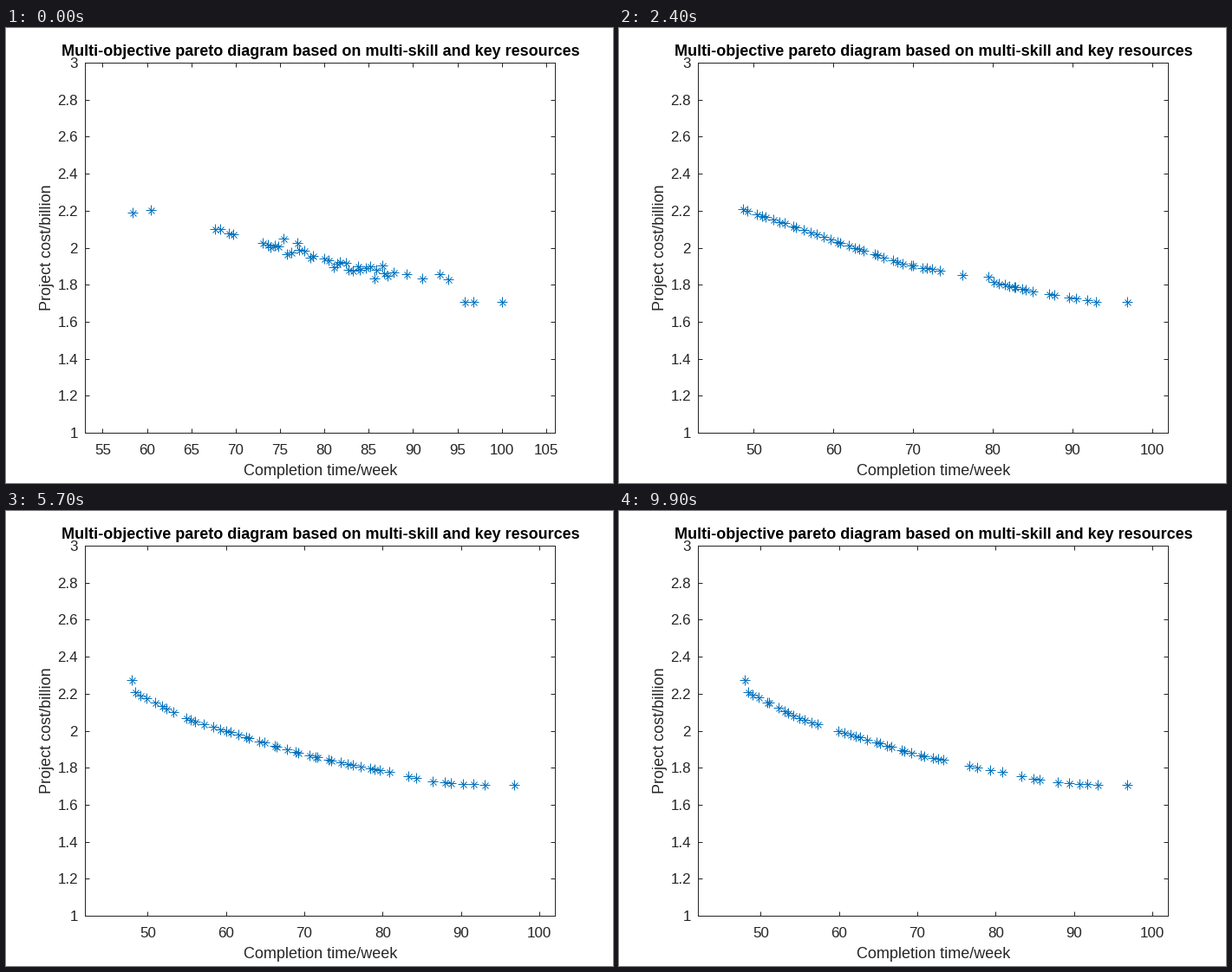
Animation of 700 by 525 pixels, one loop 10000 ms. Source, as a matplotlib script:

```python
import numpy as np
import matplotlib.pyplot as plt
from matplotlib.animation import FuncAnimation
from matplotlib.ticker import FormatStrFormatter, MultipleLocator

W, H, DPI = 700, 525, 100
PX = 72 / DPI
FRAMES, INTERVAL = 100, 100
INK, BLUE = "#262626", "#0072BD"
BIN = 1.5  # weeks replaced together

plt.rcParams["font.family"] = "Liberation Sans"

# Cost curves: a few (week, cost) key points each
ROUGH = [(58.4, 2.19), (60.4, 2.205), (67.65, 2.1), (75, 2.0), (85, 1.88),
         (94, 1.83), (95.8, 1.705), (100.05, 1.705)]
EARLY = [(49, 2.268), (53.2, 2.22), (54.4, 2.184), (55.85, 2.104),
         (60.5, 2.067), (62.5, 2.01), (67.7, 1.992), (69, 1.925),
         (70.6, 1.894), (78.9, 1.88), (84, 1.775), (91.2, 1.744),
         (93, 1.707)]
MIDDLE = [(48.66, 2.207), (56.4, 2.095), (62.5, 2.003), (69, 1.91),
          (76.2, 1.852), (79.4, 1.845), (80, 1.815), (85, 1.763),
          (93, 1.707)]
BEST = [(47.97, 2.272), (48.41, 2.207), (55, 2.065), (62, 1.972),
        (70, 1.87), (78, 1.8), (87, 1.722), (93, 1.707)]


def front(curve, runs, seed, spread=0.0):
    """Points along a curve; each run is (first week, last week, count)."""
    rng = np.random.default_rng(seed)
    kx, ky = np.transpose(curve)
    parts = []
    for start, end, n in runs:
        x = np.linspace(start, end, n)
        inner = (x > start) & (x < end)
        step = (end - start) / max(n - 1, 1)
        x = x + inner * rng.uniform(-0.45, 0.45, n) * step
        y = np.interp(x, kx, ky) + inner * rng.normal(0, spread, n)
        parts.append(np.column_stack([x, y]))
    return np.vstack(parts)


HEAD = [(47.97, 47.97, 1)]
TAIL = [(83.3, 93, 8), (96.84, 96.84, 1)]

STAGES = [
    (0, front(ROUGH, [(58.4, 60.4, 2), (67.65, 69.7, 4), (73.05, 78.7, 13),
                      (80, 87.8, 18), (89.25, 93.95, 4), (95.8, 96.8, 2),
                      (100.05, 100.05, 1)], 1, spread=0.025)),
    (10, front(EARLY, [(48.98, 54.4, 11), (55.85, 55.85, 1), (60.4, 62.5, 4),
                       (65.85, 65.85, 1), (67.7, 70.6, 7), (77.15, 77.15, 1),
                       (78.9, 84.45, 13), (87.05, 91.2, 2), (92.25, 93, 3),
                       (96.83, 96.83, 1)], 2)),
    (24, front(MIDDLE, [(48.66, 73.4, 33), (76.17, 76.17, 1), (79.43, 85, 10),
                        (87.05, 93, 6), (96.83, 96.83, 1)], 3)),
    (45, front(BEST, [(48.44, 80.74, 37)] + TAIL, 4)),
    (57, front(BEST, HEAD + [(48.41, 80.82, 38)] + TAIL, 5)),
    (83, front(BEST, HEAD + [(48.41, 67.8, 24), (70.64, 80.82, 14)] + TAIL, 6)),
    (99, front(BEST, HEAD + [(48.41, 57.26, 13), (59.92, 73.3, 18),
                             (76.6, 80.82, 4)] + TAIL, 7)),
]


def converge(a, b, t, rng):
    """The scattered population drifts unevenly onto its first front."""
    match = b[np.linspace(0, len(b) - 1, len(a)).round().astype(int)]
    noise = rng.normal(0, 0.35, len(a)) * t * (1 - t)
    p = np.clip(t * (2 - t) + noise, 0, 1)[:, None]
    return a + (match - a) * p


def replace(a, b, t, rng):
    """Each stretch of the front swaps to its successor at its own moment."""
    swap = rng.uniform(0.03, 0.98, 80)
    swap[int(HEAD[0][0] / BIN)] = 0.5
    old = t < swap[(a[:, 0] / BIN).astype(int)]
    new = t >= swap[(b[:, 0] / BIN).astype(int)]
    return np.vstack([a[old], b[new]])


def population(i):
    k = max(k for k in range(len(STAGES) - 1) if STAGES[k][0] <= i)
    (start, a), (end, b) = STAGES[k], STAGES[k + 1]
    t = (i - start) / (end - start)
    if t == 0:
        return a
    if t == 1:
        return b
    if k == 0:
        return converge(a, b, t, np.random.default_rng(i))
    return replace(a, b, t, np.random.default_rng(70 + k))


fig = plt.figure(figsize=(W / DPI, H / DPI), dpi=DPI, facecolor="white")
ax = fig.add_axes([91 / W, 58 / H, 542 / W, 427 / H])
ax.set_ylim(1, 3)
ax.yaxis.set_major_locator(MultipleLocator(0.2))
for axis in (ax.xaxis, ax.yaxis):
    axis.set_major_formatter(FormatStrFormatter("%g"))
ax.tick_params(direction="in", top=True, right=True, length=5 * PX,
               width=PX, color=INK, labelcolor=INK, labelsize=17 * PX)
ax.tick_params(axis="x", pad=12.5 * PX)
ax.tick_params(axis="y", pad=8 * PX)
for spine in ax.spines.values():
    spine.set(color=INK, linewidth=PX)


def label(x, y, text, **kw):
    fig.text(x / W, 1 - y / H, text, size=18 * PX, ha="center", va="baseline",
             rotation_mode="anchor", **kw)


label(362.5, 32, "Multi-objective pareto diagram based on multi-skill "
      "and key resources", weight="bold", color="black")
label(362.5, 516, "Completion time/week", color=INK)
label(52, 253, "Project cost/billion", color=INK, rotation=90)

# An eight-armed star: an upright cross over a smaller diagonal one
stars = [ax.plot([], [], m, ms=size * PX, mew=PX, color=BLUE)[0]
         for m, size in (("+", 12), ("x", 7))]


def update(i):
    pts = population(i)
    lo = np.floor(pts[:, 0].min()) - 5
    hi = np.ceil(pts[:, 0].max()) + 5
    ax.set_xlim(lo, hi)
    ax.xaxis.set_major_locator(MultipleLocator(5 if hi - lo < 56 else 10))
    for s in stars:
        s.set_data(pts[:, 0], pts[:, 1])
    return stars


anim = FuncAnimation(fig, update, frames=FRAMES, interval=INTERVAL,
                     init_func=lambda: update(0), repeat=True,
                     repeat_delay=0, blit=False)
plt.show()
```
